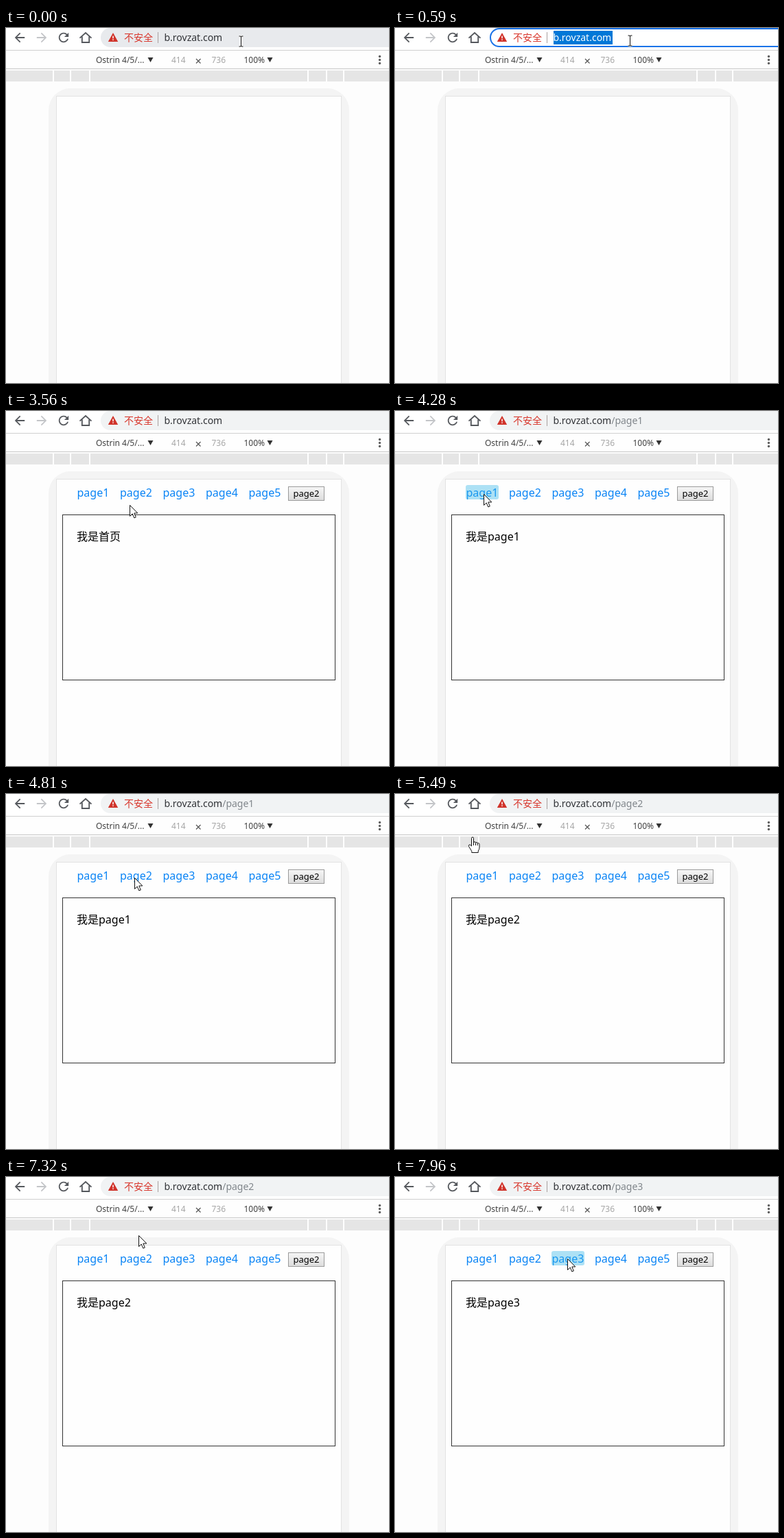
An HTML page for the animation above (7990 ms loop, 558 px wide and 518 px high).

```html
<!DOCTYPE html>
<html lang="zh">
<head>
<meta charset="utf-8">
<style>
html, body { margin: 0; width: 100%; height: 100%; overflow: hidden; background: #fdfdfd; }
svg { display: block; }
text { font-family: "Noto Sans", "Noto Sans CJK SC", sans-serif; white-space: pre; }
.url { font-size: 14px; fill: #303236; }
.path { fill: #80868b; }
.tool { font-size: 12px; fill: #404040; }
.tool.dim { fill: #a6a6a6; }
.link { font-size: 16px; fill: #0a84f5; }
.body { font-size: 16px; fill: #000; }
.icon { fill: #55585d; }
.line { fill: none; stroke: #55585d; stroke-width: 1.9; }
.ptr { fill: #fff; stroke: #111; stroke-width: 1; stroke-linejoin: round; }
</style>
</head>
<body>
<svg width="558" height="518" viewBox="0 0 558 518">
  <defs>
    <path id="arrow" d="M20 11H7.83l5.59-5.59L12 4l-8 8 8 8 1.41-1.41L7.83 13H20z"/>
    <linearGradient id="face" x2="0" y2="1">
      <stop offset="0" stop-color="#f6f6f6"/><stop offset="1" stop-color="#dcdcdc"/>
    </linearGradient>
    <clipPath id="chipClip"><rect id="chipBox" x="168" y="0" width="0" height="30"/></clipPath>
  </defs>

  <!-- browser bar -->
  <rect width="558" height="32" fill="#fff"/>
  <circle id="backDisc" cx="20" cy="14" r="14" fill="#e2e3e4"/>
  <circle id="nextDisc" cx="52" cy="14" r="14" fill="#e2e3e4"/>
  <use href="#arrow" class="icon" transform="translate(9.2 3.2) scale(.9)"/>
  <use href="#arrow" id="next" transform="translate(62.8 3.2) scale(-.9 .9)"/>
  <path id="reload" class="icon" transform="translate(73.2 3.2) scale(.9)" d="M17.65 6.35C16.2 4.9 14.21 4 12 4c-4.42 0-7.99 3.58-7.99 8s3.57 8 7.99 8c3.73 0 6.84-2.55 7.73-6h-2.08c-.82 2.33-3.04 4-5.65 4-3.31 0-6-2.69-6-6s2.69-6 6-6c1.66 0 3.14.69 4.22 1.78L13 11h7V4z"/>
  <path id="stop" class="line" d="M78.5 8.5l11 11m0-11l-11 11"/>
  <path class="line" d="M107.5 14.6L116 7l8.5 7.6M110.8 12.5V21h10.4V12.5"/>
  <rect id="pill" x="138" y="0" width="450" height="28" rx="14"/>
  <rect id="ring" x="139" y="1" width="450" height="26" rx="13" fill="none" stroke="#1a73e8" stroke-width="2"/>
  <g id="info">
    <circle class="line" cx="156" cy="14" r="6.2" style="stroke-width:1.5"/>
    <path class="line" d="M156 10.2v1.6m0 1.4v4.5" style="stroke-width:1.6"/>
  </g>
  <g id="warn">
    <path d="M156 7l7.2 13h-14.4z" fill="#d0332a"/>
    <path d="M156 11.6v3.6m0 1.3v1.6" stroke="#fff" stroke-width="1.5"/>
  </g>
  <g clip-path="url(#chipClip)">
    <text x="172" y="19" font-size="14" fill="#d8362c">不安全</text>
    <rect x="221" y="6" width="1" height="16" fill="#a9a0a0"/>
  </g>
  <rect id="pick" x="231" y="4" width="86" height="20" fill="#0078d7"/>
  <text id="url" class="url" y="19"><tspan id="host">b.rovzat.com</tspan><tspan id="path" class="path"></tspan></text>

  <!-- device toolbar -->
  <rect y="32" width="558" height="1" fill="#cfcfcf"/>
  <rect y="33" width="558" height="26" fill="#fefefe"/>
  <rect y="59" width="558" height="1" fill="#c8c8c8"/>
  <text class="tool" x="131" y="51">Ostrin 4/5/...</text>
  <text class="tool dim" x="241" y="51">414</text>
  <text class="tool dim" x="299.5" y="51">736</text>
  <text class="tool" x="346.5" y="51">100%</text>
  <path d="M206.5 43h8l-4 7zM380.5 43h8l-4 7z" fill="#333"/>
  <path d="M277 45l6.5 6.5m0-6.5l-6.5 6.5" stroke="#555" stroke-width="1.2"/>
  <g fill="#5c5c5c">
    <circle cx="544.5" cy="41.5" r="1.7"/><circle cx="544.5" cy="46.5" r="1.7"/><circle cx="544.5" cy="51.5" r="1.7"/>
  </g>
  <rect y="62" width="558" height="16" fill="#e5e5e5"/>
  <path d="M69 62v16M94 62v16M122 62v16M440 62v16M467 62v16M492 62v16" stroke="#fff" stroke-width="2"/>

  <!-- device -->
  <rect x="62" y="88" width="438" height="480" rx="32" fill="#f4f4f4"/>
  <rect x="73.5" y="99.5" width="415" height="460" fill="#fefefe" stroke="#e2e2e2"/>
  <g id="page">
    <g id="links"></g>
    <rect x="411.5" y="110.5" width="52" height="20" fill="url(#face)" stroke="#9a9a9a"/>
    <text x="418.5" y="125" font-size="13">page2</text>
    <rect x="82.5" y="151.5" width="397" height="241" fill="none" stroke="#333"/>
    <text id="words" class="body" x="103" y="189"></text>
    <rect id="tap" y="108" width="48" height="21" rx="3" fill="#33b5e5" fill-opacity=".4"/>
  </g>

  <g id="cursor">
    <g id="beam" fill="none">
      <path d="M-3 -7.5h2.5l.5 1 .5 -1H3M0 -7V7M-3 7.5h2.5l.5 -1 .5 1H3" stroke="#fff" stroke-width="2.4"/>
      <path d="M-3 -7.5h2.5l.5 1 .5 -1H3M0 -7V7M-3 7.5h2.5l.5 -1 .5 1H3" stroke="#111"/>
    </g>
    <path id="point" class="ptr" d="M.5 .5V16.5L4.2 13 6.8 19 9.3 18 6.8 12H11.8Z"/>
    <g id="hand">
      <path class="ptr" d="M-1.5 13V1.5Q-1.5 0 0 0T1.5 1.5V8Q1.5 6.8 3 6.8T4.5 8.4Q4.8 7.4 6 7.6T7.3 9.2Q7.8 8.4 8.9 8.7T10 10.4V15Q10 18 8.2 20V22.5H-1.2V20.5L-5.4 13.6Q-6.3 11.8 -5 11.2T-2.8 11.8Z"/>
      <path d="M1.5 8v4M4.5 8.4v3.6M7.3 9.2v3" stroke="#111"/>
    </g>
  </g>
</svg>
<script>
const LOOP = 7990;
const $ = id => document.getElementById(id);
const show = (id, on) => $(id).setAttribute('visibility', on ? 'inherit' : 'hidden');
const set = (id, attrs) => { for (const k in attrs) $(id).setAttribute(k, attrs[k]); };
const linkX = n => 103.5 + 62.5 * (n - 1);

$('links').innerHTML = [1, 2, 3, 4, 5]
  .map(n => `<text class="link" x="${linkX(n)}" y="125">page${n}</text>`).join('');

// time, x, y of the pointer's hot spot
const track = [
  [0, 342, 19], [189, 342, 19], [190, 342, 18], [3200, 342, 18],
  [3290, 312, 46], [3400, 246, 98], [3480, 205, 126], [3560, 180, 137],
  [3620, 160, 145], [3680, 140, 134], [3740, 129, 121], [4400, 129, 121],
  [4560, 148, 128], [4700, 176, 125], [4810, 187, 122], [5370, 187, 122],
  [5430, 155, 92], [5490, 113, 63], [5600, 72, 40], [5780, 40, 22], [6040, 25, 11],
  [6540, 25, 11], [6580, 27, 11], [6700, 51, 13], [7030, 51, 13],
  [7150, 95, 38], [7350, 210, 93], [7380, 213, 96], [7540, 236, 112], [7690, 251, 119]
];

// state changes, each kept until replaced
const steps = [
  [0, { bar: '#e8eaed', page: -1, tap: 0, focus: 0, pick: 0, busy: 0, next: 0, ptr: 'beam' }],
  [540, { bar: '#fff', focus: 1 }],
  [590, { pick: 1 }],
  [2500, { bar: '#f1f3f4', focus: 0, pick: 0, busy: 1 }],
  [2560, { page: 0 }],
  [2640, { busy: 0 }],
  [3260, { ptr: 'point' }],
  [4150, { tap: 1 }],
  [4220, { page: 1 }],
  [4290, { tap: 0 }],
  [5020, { tap: 2 }],
  [5080, { page: 2 }],
  [5160, { tap: 0 }],
  [5400, { ptr: 'hand' }],
  [5540, { ptr: 'point' }],
  [6240, { page: 1, next: 1 }],
  [6860, { page: 2, next: 0 }],
  [7850, { tap: 3 }],
  [7900, { page: 3 }]
];

const ramp = (t, a, b) => Math.min(1, Math.max(0, (t - a) / (b - a)));

function pointerAt(t) {
  const i = track.findIndex(k => k[0] > t);
  if (i < 0) return track[track.length - 1].slice(1);
  const [a, b] = [track[i - 1], track[i]], p = ramp(t, a[0], b[0]);
  return [1, 2].map(k => Math.round(a[k] + (b[k] - a[k]) * p));
}

function draw(t) {
  const s = Object.assign({}, ...steps.filter(k => k[0] <= t).map(k => k[1]));
  const chip = t < 2500 ? 1 : ramp(t, 2560, 2700);

  set('pill', { fill: s.bar });
  show('ring', s.focus);
  show('pick', s.pick);
  set('host', { fill: s.pick ? '#fff' : '#303236' });
  $('path').textContent = s.page > 0 ? '/page' + s.page : '';
  set('url', { x: 171.5 + 59 * chip });
  set('chipBox', { width: 59 * chip });
  show('info', !chip);
  show('warn', chip);
  show('stop', s.busy);
  show('reload', !s.busy);
  set('next', { fill: s.next ? '#55585d' : '#c3c5c8' });
  set('backDisc', { opacity: ramp(t, 6160, 6240) - ramp(t, 6570, 6680) });
  set('nextDisc', { opacity: ramp(t, 6650, 6730) - ramp(t, 7060, 7150) });

  show('page', s.page >= 0);
  $('words').textContent = '我是' + (s.page > 0 ? 'page' + s.page : '首页');
  show('tap', s.tap);
  if (s.tap) set('tap', { x: linkX(s.tap) - 0.5 });

  for (const p of ['beam', 'point', 'hand']) show(p, s.ptr === p);
  const [x, y] = pointerAt(t), half = s.ptr === 'beam' ? 0.5 : 0;
  set('cursor', { transform: `translate(${x + half} ${y + half})` });
}

const start = performance.now();
function tick() {
  draw((performance.now() - start) % LOOP);
  requestAnimationFrame(tick);
}
tick();
</script>
</body>
</html>
```
